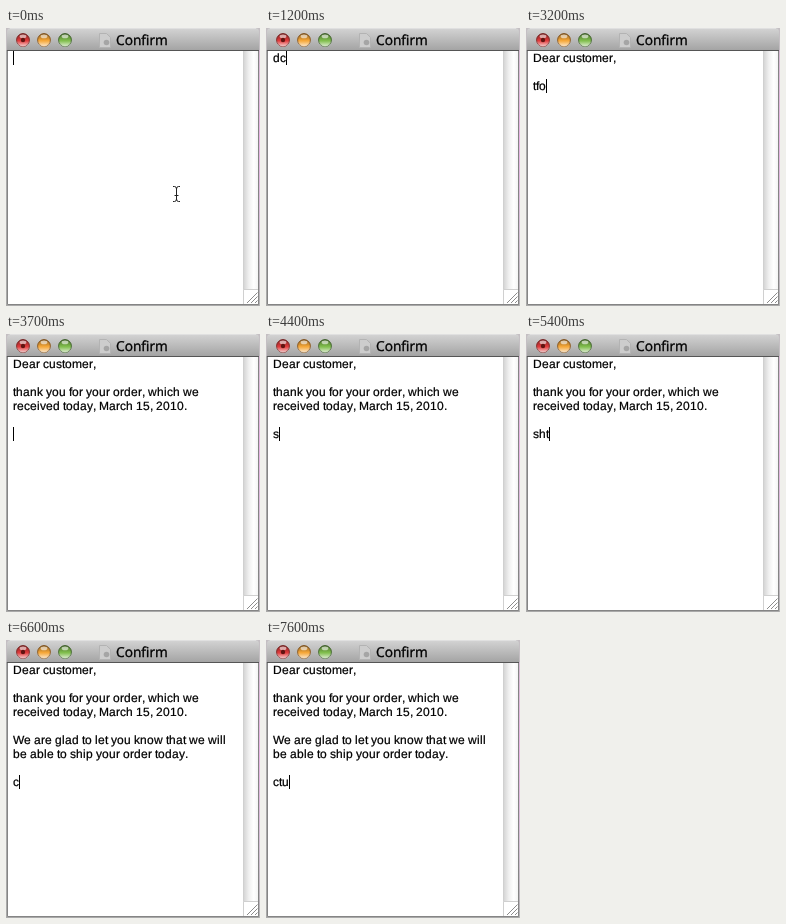
Recreate the animation shown at these times as an HTML page. Size 254 by 278 pixels, loop 8000 ms.

```html
<!DOCTYPE html>
<html lang="en">
<head>
<meta charset="utf-8">
<title>Typing abbreviations</title>
<style>
  html, body { margin: 0; width: 100%; height: 100%; overflow: hidden; background: #fff; }
  svg { display: block; width: 254px; height: 278px; }
  text { white-space: pre; text-rendering: geometricPrecision; stroke: #000; }
  #title { font: 13.7px "Open Sans", sans-serif; stroke-width: .35px; }
  #lines { font: 12px "Liberation Sans", Arial, sans-serif; stroke-width: .22px; }
</style>
</head>
<body>
<svg viewBox="0 0 254 278">
  <defs>
    <linearGradient id="bar" x2="0" y2="1">
      <stop stop-color="#d4d4d4"/><stop offset="1" stop-color="#a4a4a4"/>
    </linearGradient>
    <linearGradient id="track">
      <stop stop-color="#d6d6d6"/><stop offset=".35" stop-color="#f0f0f0"/>
      <stop offset=".7" stop-color="#fff"/><stop offset="1" stop-color="#f4f4f4"/>
    </linearGradient>
    <linearGradient id="desktop" x2="0" y2="1">
      <stop stop-color="#d3bfd0"/><stop offset=".4" stop-color="#e8b4e5"/>
      <stop offset=".75" stop-color="#d3c0d5"/><stop offset="1" stop-color="#b5b5b5"/>
    </linearGradient>
    <linearGradient id="gloss" x2="0" y2="1">
      <stop stop-color="#000" stop-opacity=".4"/><stop offset=".45" stop-color="#000" stop-opacity=".08"/>
      <stop offset=".55" stop-color="#fff" stop-opacity="0"/><stop offset="1" stop-color="#fff" stop-opacity=".75"/>
    </linearGradient>
  </defs>

  <rect width="254" height="278" fill="#a9a9a9"/>
  <rect x="253" width="1" height="278" fill="url(#desktop)"/>
  <rect x="1" y="22" width="251" height="254" fill="#fff"/>
  <path d="M1.5 276V22M252.5 22V276.5H1.5" fill="none" stroke="#858585"/>

  <path d="M0 0H254V22H0Z" fill="#c4bfc3"/>
  <path d="M1 22V4Q1 0 5 0H249Q253 0 253 4V22Z" fill="url(#bar)"/>
  <path d="M4 .5H250" stroke="#e0e0e0"/>
  <path d="M1 22.5H253" stroke="#555"/>

  <g id="buttons"></g>

  <path d="M93.5 5.5H100.5L104.5 9.5V19.5H93.5Z" fill="#cdcdcd" stroke="#b3b3b3"/>
  <circle cx="100.5" cy="14.5" r="2.8" fill="#a5a5a5"/>
  <text id="title" x="110" y="17">Confirm</text>

  <rect x="238" y="23" width="14" height="239" fill="url(#track)"/>
  <path d="M237.5 23V262" stroke="#d0d0d0"/>
  <path d="M237.5 276V261.5H252" fill="#fff" stroke="#d0d0d0"/>
  <path d="M241 275L251.5 264.5M245 275L251.5 268.5M249 275L251.5 272.5" stroke="#8c8c8c"/>

  <g id="lines"></g>
  <rect id="caret" width="1" height="14"/>
  <path id="pointer" d="M167 158.5H168.5Q170.5 158.5 170.5 161V171Q170.5 173.5 168.5 173.5H167M174 158.5H172.5Q170.5 158.5 170.5 161M170.5 171Q170.5 173.5 172.5 173.5H174M168.5 167.5H172.5" fill="none" stroke="#222"/>
</svg>

<script>
const LOOP = 8000;
const LINE_HEIGHT = 14, LEFT = 7, TOP = 23;
const NS = "http://www.w3.org/2000/svg";
const byId = id => document.getElementById(id);

function add(parent, tag, attributes) {
  const node = document.createElementNS(NS, tag);
  for (const name in attributes) node.setAttribute(name, attributes[name]);
  return parent.appendChild(node);
}

function button(x, fill, rim) {
  const circle = { cx: x, cy: 12, r: 6.4 };
  const group = byId("buttons");
  add(group, "circle", { ...circle, fill, stroke: rim });
  add(group, "circle", { ...circle, fill: "url(#gloss)" });
  add(group, "ellipse", { cx: x, cy: 8.4, rx: 3.4, ry: 1.8, fill: "#fff", opacity: .6 });
}
button(17, "#e0393a", "#85302e");
button(38, "#f5a637", "#8f602c");
button(59, "#7fbd4b", "#4b6d38");
add(byId("buttons"), "circle", { cx: 17, cy: 12, r: 2.2, fill: "#621411" });

const greeting = "Dear customer,\n\n";
const thanks = greeting + "thank you for your order, which we\nreceived today, March 15, 2010.\n\n";
const shipping = thanks + "We are glad to let you know that we will\nbe able to ship your order today.\n\n";

// Each abbreviation is typed letter by letter, then replaced by its paragraph.
const steps = [
  [0, ""], [700, "d"], [1200, "dc"],
  [1700, greeting], [2200, greeting + "t"], [2700, greeting + "tf"], [3200, greeting + "tfo"],
  [3700, thanks], [4400, thanks + "s"], [4900, thanks + "sh"], [5400, thanks + "sht"],
  [5900, shipping], [6600, shipping + "c"], [7100, shipping + "ct"], [7600, shipping + "ctu"]
];

const ruler = document.createElement("canvas").getContext("2d");
ruler.font = getComputedStyle(byId("lines")).font;

// Letters advance by whole pixels without kerning; the last stop is the line's end.
function letterStops(line) {
  const stops = [LEFT];
  for (const letter of line) stops.push(stops.at(-1) + Math.round(ruler.measureText(letter).width));
  return stops;
}

let shown;
function showText(content) {
  if (content === shown) return;
  shown = content;
  byId("lines").replaceChildren();
  content.split("\n").forEach((line, i) => {
    const stops = letterStops(line);
    const y = TOP + i * LINE_HEIGHT;
    add(byId("lines"), "text", { x: stops.join(" "), y: y + 11 }).textContent = line;
    byId("caret").setAttribute("x", stops.at(-1));
    byId("caret").setAttribute("y", y);
  });
  byId("pointer").style.display = content ? "none" : "";
}

function draw() {
  const time = performance.now() % LOOP;
  showText(steps.findLast(([start]) => time >= start)[1]);
  requestAnimationFrame(draw);
}
draw();
</script>
</body>
</html>
```
